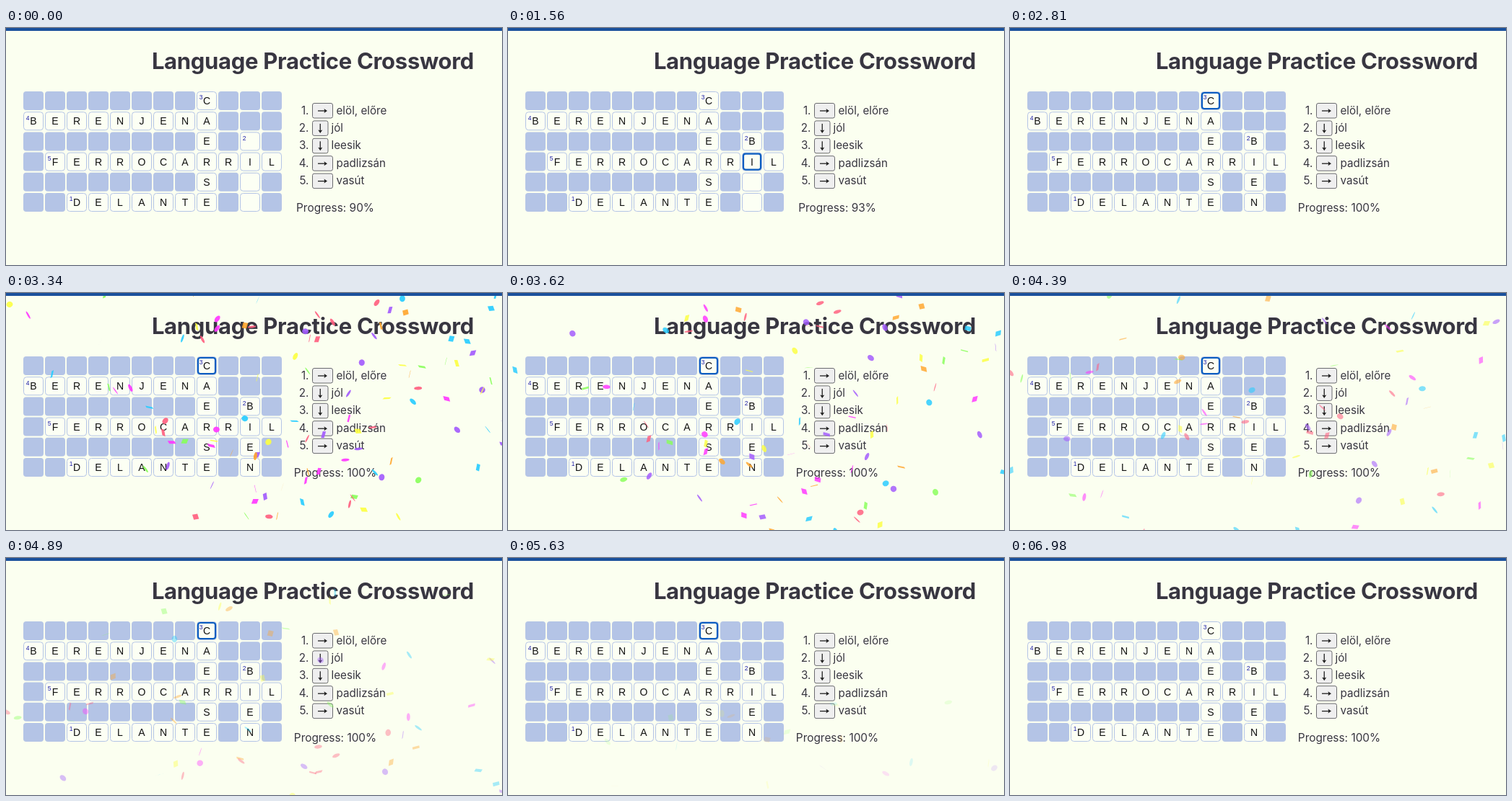
Animation of 687x329 px, one loop 7.03 s. Source, as an HTML page with a canvas:

```html
<!DOCTYPE html>
<html lang="en">
<head>
<meta charset="utf-8">
<title>Language Practice Crossword</title>
<style>
  html, body { margin: 0; width: 100%; height: 100%; overflow: hidden; background: #fbfff0; }
  canvas { display: block; width: 687px; height: 329px; }
</style>
</head>
<body>
<canvas id="stage"></canvas>
<script>
const W = 687, H = 329, LOOP = 7030;
const SANS = 'Inter, "Open Sans", sans-serif';
const ARIAL = '"Liberation Sans", Arial, sans-serif';
const BG = '#fbfff0', INK = '#383641', BLOCK = '#b4c4e6', RING = '#0b5cc0';

const canvas = document.getElementById('stage');
const ctx = canvas.getContext('2d');
const dpr = window.devicePixelRatio || 1;
canvas.width = W * dpr;
canvas.height = H * dpr;

const GRID = [
  '........C...',
  'BERENJENA...',
  '........E.B.',
  '.FERROCARRIL',
  '........S.E.',
  '..DELANTE.N.'
];
const NUMBERS = { '2,5': 1, '10,2': 2, '8,0': 3, '0,1': 4, '1,3': 5 };
const TYPED_AT = { '10,2': 1560, '10,4': 2460, '10,5': 2810 };
const CLUES = [
  ['right', 'elöl, előre'],
  ['down', 'jól'],
  ['down', 'leesik'],
  ['right', 'padlizsán'],
  ['right', 'vasút']
];
// Each entry: start time, focused cell, progress
const STATES = [
  [0, '', 90],
  [540, '10,2', 90],
  [1560, '10,3', 93],
  [1980, '10,4', 93],
  [2460, '10,5', 97],
  [2810, '8,0', 100],
  [6980, '', 100]
];

function text(str, x, y, font, color, align = 'left', base = 'alphabetic') {
  ctx.font = font;
  ctx.fillStyle = color;
  ctx.textAlign = align;
  ctx.textBaseline = base;
  ctx.fillText(str, x, y);
}

function box(x, y, w, h, r, fill, stroke, line = 1) {
  ctx.beginPath();
  ctx.roundRect(x, y, w, h, r);
  if (fill) { ctx.fillStyle = fill; ctx.fill(); }
  if (stroke) { ctx.strokeStyle = stroke; ctx.lineWidth = line; ctx.stroke(); }
}

function drawCell(col, row, t, focus) {
  const x = 24 + col * 30, y = 88 + row * 28.2;
  const letter = GRID[row][col], key = col + ',' + row;
  if (letter === '.') {
    box(x, y, 28, 26, 4, BLOCK);
    return;
  }
  box(x + 0.5, y + 0.5, 27, 25, 4, '#fcfff4', BLOCK);
  if (key === focus) box(x + 2, y + 2, 24, 22, 3, null, RING, 2.2);
  if (NUMBERS[key]) text(NUMBERS[key], x + 6, y + 11.3, '8.5px ' + ARIAL, '#2020a8', 'center');
  if (t >= (TYPED_AT[key] || 0)) text(letter, x + 14, y + 18, '14px ' + ARIAL, '#111', 'center');
}

function drawArrow(x, y, dir) {
  ctx.save();
  ctx.translate(x, y);
  if (dir === 'down') ctx.rotate(Math.PI / 2);
  ctx.fillStyle = '#222';
  ctx.fillRect(-6.5, -0.65, 10, 1.3);
  ctx.beginPath();
  ctx.moveTo(6.5, 0);
  ctx.lineTo(2, -3);
  ctx.lineTo(2.8, 0);
  ctx.lineTo(2, 3);
  ctx.fill();
  ctx.restore();
}

function drawClue([dir, word], i) {
  const y = 114.5 + i * 24.4, w = dir === 'right' ? 28 : 21.5;
  text(i + 1 + '.', 419.5, y + 5, '15.2px ' + SANS, INK, 'right');
  box(424.5, y - 10, w, 20.5, 2.5, '#efefef', '#6b6b70');
  drawArrow(424.5 + w / 2, y + 0.5, dir);
  text(word, 424.5 + w + (dir === 'right' ? 5 : 4.5), y + 5, '15.2px ' + SANS, INK);
}

// Confetti: one burst from below, slowed by drag and pulled down evenly
const COLORS = ['#26ccff', '#a25afd', '#ff5e7e', '#88ff5a', '#fcff42', '#ffa62d', '#ff36ff'];
const BURST = 3070, FIRST = 3110, LAST = 6090, STEP = 57.25, TICK = 15, TICKS = 200;

let seed = 20;
function rand() {
  seed = (seed + 0x6D2B79F5) | 0;
  let n = Math.imul(seed ^ (seed >>> 15), 1 | seed);
  n = (n + Math.imul(n ^ (n >>> 7), 61 | n)) ^ n;
  return ((n ^ (n >>> 14)) >>> 0) / 4294967296;
}

const pieces = Array.from({ length: 150 }, (_, i) => ({
  angle: -Math.PI / 2 + (rand() - 0.5) * 1.65,
  speed: 18 + rand() * 58,
  wobble: rand() * 10,
  wobbleSpeed: Math.min(0.11, rand() * 0.1 + 0.05),
  tilt: (rand() * 0.5 + 0.25) * Math.PI,
  color: COLORS[i % COLORS.length],
  round: rand() < 0.5
}));

function drawPiece(p, n) {
  const reach = p.speed * (1 - 0.9 ** n) / 0.1;
  const x = 425 + Math.cos(p.angle) * reach;
  const y = 410 + Math.sin(p.angle) * reach + 3 * n;
  const wobble = p.wobble + p.wobbleSpeed * n, tilt = p.tilt + 0.1 * n;
  const wx = 10 * Math.cos(wobble), wy = 10 * Math.sin(wobble);
  const tx = 2.5 * Math.cos(tilt), ty = 2.5 * Math.sin(tilt);
  ctx.fillStyle = p.color;
  ctx.beginPath();
  if (p.round) {
    ctx.ellipse(x, y, Math.abs(wx) * 0.6, Math.abs(wy) * 0.6, Math.PI / 10 * wobble, 0, 2 * Math.PI);
  } else {
    ctx.moveTo(x, y);
    ctx.lineTo(x + wx, y + ty);
    ctx.lineTo(x + wx + tx, y + wy + ty);
    ctx.lineTo(x + tx, y + wy);
  }
  ctx.fill();
}

function drawConfetti(t) {
  if (t < FIRST || t >= LAST) return;
  const shown = FIRST + Math.floor((t - FIRST) / STEP) * STEP;
  const n = (shown - BURST) / TICK;
  ctx.globalAlpha = Math.max(0, 1 - n / TICKS);
  pieces.forEach(p => drawPiece(p, n));
  ctx.globalAlpha = 1;
}

function draw(t) {
  const [, focus, progress] = STATES.findLast(s => t >= s[0]);
  ctx.setTransform(dpr, 0, 0, dpr, 0, 0);
  ctx.fillStyle = BG;
  ctx.fillRect(0, 0, W, H);

  ctx.letterSpacing = '-0.3px';
  text('Language Practice Crossword', 425, 57, 'bold 31px ' + SANS, INK, 'center');
  ctx.letterSpacing = '0px';

  GRID.forEach((line, row) => {
    for (let col = 0; col < line.length; col++) drawCell(col, row, t, focus);
  });
  CLUES.forEach(drawClue);
  text('Progress: ' + progress + '%', 456, 255, '15.4px ' + SANS, INK, 'center');

  drawConfetti(t);
  ctx.fillStyle = '#1a509c';
  ctx.fillRect(0, 0, W, 4);
}

const start = performance.now();
function tick() {
  draw((performance.now() - start) % LOOP);
  requestAnimationFrame(tick);
}
tick();
</script>
</body>
</html>
```
